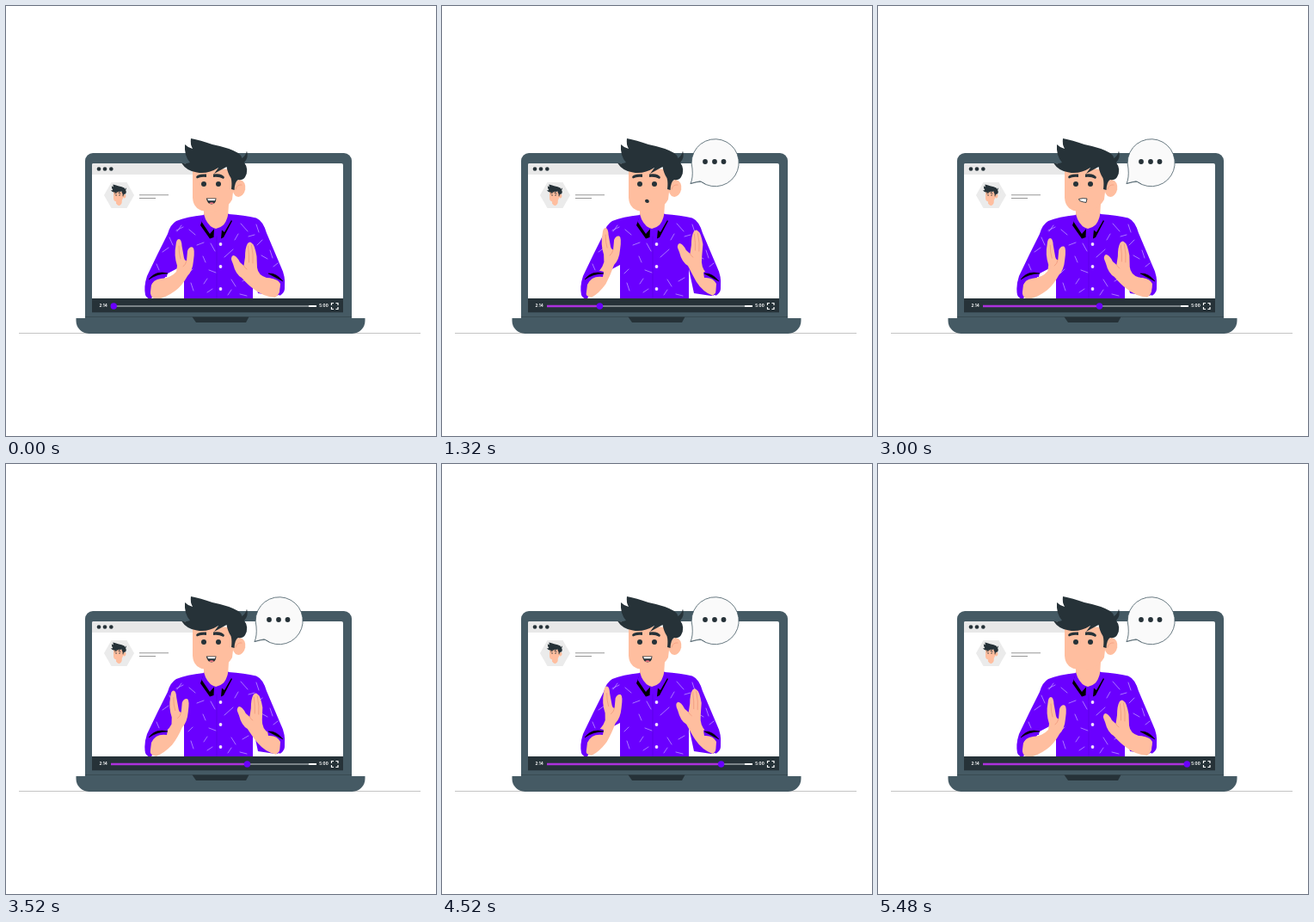
Recreate the animation shown at these times as an HTML page. Size 500 by 500 pixels, loop 5.52 s.

```html
<!DOCTYPE html>
<html lang="en">
<head>
<meta charset="utf-8">
<title>Video lesson</title>
<style>
  html, body { margin: 0; width: 100%; height: 100%; overflow: hidden; background: #fff; }
  svg { display: block; width: 100%; height: 100%; }
  .time { font: 700 4.5px Inter, Roboto, sans-serif; fill: #fff; }
  .skin { fill: #ffbe9f; }
  .ink { fill: #263238; }
  .slate { fill: #455a64; }
  .shirt { fill: #6a00ff; }
  .line { fill: none; stroke-linecap: round; stroke-linejoin: round; }
</style>
</head>
<body>
<svg viewBox="0 0 500 500">
  <defs>
    <g id="head">
      <path class="skin" d="M230 232V247Q232 256 244 259Q256 256 258 246L259 230Z"/>
      <path class="skin" d="M217 188V223Q218 238 234 239Q254 241 263 225L267 190Z"/>
      <ellipse class="skin" cx="271" cy="212" rx="7.300" ry="10" transform="rotate(10 271 212)"/>
      <path class="line" stroke="#f29a7c" stroke-width=".7" d="M267 213Q269 207 274 208"/>
      <path class="ink" d="M204 182.500Q209 184 214 182Q207 174 208 161Q212 165 217 166Q214 161 215 154Q226 156 240 161Q260 165 270 171Q273 173 274.500 177Q279 174 280 168.500Q282.500 176 277 182Q283 190 278 199Q275 203 270 202Q266 204 265.500 214L262 213Q263 205 261.500 200Q258 195 256.500 187Q249 191 242 195Q245 191 247 188Q234 196 222 193.500Q210 192 204 182.500Z"/>
      <path class="ink" d="M221 199Q222 195 233 195.500L233 199Q227 198 222 200.500ZM241 195.500Q251 194 254 199L253 201Q247 198 241 199Z"/>
      <circle class="ink" cx="230" cy="207" r="3"/>
      <circle class="ink" cx="247" cy="207" r="3"/>
    </g>
  </defs>

  <rect width="500" height="500" fill="#fff"/>
  <path d="M15 380.500H482" stroke="#c4c4c4"/>

  <!-- laptop -->
  <path class="slate" d="M92 363V180A9 9 0 0 1 101 171H393A9 9 0 0 1 402 180V363Z"/>
  <rect x="100" y="183" width="292" height="160" rx="2" fill="#fff"/>
  <path d="M100 196V185Q100 183 102 183H240V196Z" fill="#e8e8e8"/>
  <g class="ink">
    <circle cx="108" cy="189.500" r="2.300"/>
    <circle cx="115" cy="189.500" r="2.300"/>
    <circle cx="122.300" cy="189.500" r="2.300"/>
  </g>
  <path d="M114 220L122.500 205H140.500L149 220L140.500 235H122.500Z" fill="#ebebeb"/>
  <use href="#head" transform="translate(74 171.300) scale(.235)"/>
  <path d="M155 219.800H189M155 223.500H174" stroke="#969696" stroke-width="1.100"/>

  <!-- presenter -->
  <path class="shirt" d="M230 243Q210 245 198 250Q191 254 188 265L176 289L164 314Q160 326 162 336Q164 341 169 340L188 311L207 301V341H287V306L293 334L313 337Q324 336 324 326Q325 314 320 304L303 264Q299 250 291 246.500Q277 243 259 242Z"/>
  <path class="line" stroke="#bd95ff" stroke-width=".8" d="M213 260l7 6M238 276l5 9M273 253l8 9M254 292l10-9M229 291l3 7M217 306l-5 5M262 318l5 8M230 323l4-6M215 322l3 9M275 320l7-4M266 272l4 -7M222 278l8-3M236 307l8 3M258 336l4-6M272 335l8 2M206 257l-8 4M190 269l4 9M182 286l7-5M175 300l3 7M199 262l5-7M291 254l3 9M298 272l-6 6M297 290l7 4M307 284l3 9M311 303l5-4M282 268l7-2M240 329l-6 4"/>
  <path class="line" stroke="#5200d0" stroke-width=".5" d="M245 268V341"/>
  <use href="#head"/>
  <path d="M229 247L226 255L237 270.500L241.500 269L242 259L237 264ZM251 260L250 270.500L253 269L263 250L260 247Z"/>
  <path class="shirt" d="M230 242L227.500 251L237 265L242 259Q233 254 230 242ZM258.500 241L262 249L254 263L249 259Q257 252 258.500 241Z"/>
  <g fill="#f3dfff">
    <circle cx="249.500" cy="277" r="1.900"/>
    <circle cx="249.500" cy="303" r="1.900"/>
    <circle cx="249.500" cy="329" r="1.900"/>
  </g>
  <g id="mouths">
    <g>
      <path class="ink" d="M232.800 223.500H244.500Q244 230.500 239 230.500Q234 230 232.800 223.500Z"/>
      <path d="M234.200 224.300H243.600L243 226.300H235Z" fill="#fff"/>
      <path d="M236 229.200Q239 227.200 242 229.200Q239 231 236 229.200Z" fill="#f2727f"/>
    </g>
    <path class="ink" d="M236 226Q238 223.500 240.500 226Q241.500 228.500 239 229Q236 229 236 226Z"/>
    <path d="M233.500 224.500Q238 223 243 224L242 228.500Q238 228 234.500 226.500Z" fill="#fff" stroke="#263238" stroke-width=".9"/>
  </g>

  <g id="arms">
    <path class="skin"/><path class="line" stroke="#ee9478" stroke-width=".7"/>
    <path class="skin"/><path class="line" stroke="#ee9478" stroke-width=".7"/>
  </g>
  <path class="shirt" d="M162 330Q161 314 173 309Q181 306 188 309L187 315Q174 313 169 324L167 340Q162 338 162 330ZM324 328Q325 313 316 309Q308 306 304 310L305 316Q315 315 319 323L318 337Q324 334 324 328Z"/>
  <path d="M166 318Q174 307 188 311Q176 311 166 318ZM305 311Q314 310 322 320Q314 316 305 311Z" stroke="#000" stroke-width=".6"/>

  <!-- player bar and base -->
  <rect class="ink" x="100" y="340" width="292" height="16.300"/>
  <path d="M92 361.500H402" stroke="#37474f" stroke-width=".8"/>
  <path class="slate" d="M81.500 363H417.500V366A15 15 0 0 1 402.500 381H96.500A15 15 0 0 1 81.500 366Z"/>
  <path class="ink" d="M216.500 361.500H282.500L279 368H221Z"/>
  <text class="time" x="108.500" y="350.300">2:14</text>
  <text class="time" x="364.300" y="350.300">5:00</text>
  <path d="M122 349H361" stroke="#cfd5d8" stroke-width="1.200"/>
  <path d="M352 349H361" stroke="#fff" stroke-width="2"/>
  <path id="played" stroke="#ad31dd" stroke-width="2.300"/>
  <circle id="knob" cy="349" r="3.700" fill="#6a00ff"/>
  <path fill="none" stroke="#fff" stroke-width="1.200" d="M378.500 348V345.500H381M383.500 345.500H386V348M386 350V352.500H383.500M381 352.500H378.500V350"/>

  <g id="bubble">
    <path d="M291 189A27.500 27.500 0 1 1 301.500 204.500Q296 204 289 206.500Q292 200 291 189Z" fill="#fafafa" stroke="#455a64" stroke-width=".8"/>
    <path class="line" stroke="#455a64" stroke-width=".6" d="M289 206.500Q296 205 300 203.500L306 207"/>
    <g class="ink">
      <circle cx="306" cy="181" r="2.900"/>
      <circle cx="317" cy="181" r="2.900"/>
      <circle cx="327.500" cy="181" r="2.900"/>
    </g>
  </g>
</svg>
<script>
const LOOP = 5520, GESTURE = LOOP / 2;
const $ = id => document.getElementById(id);
const clamp = v => Math.max(0, Math.min(1, v));
const smooth = v => (1 - Math.cos(Math.PI * clamp(v))) / 2;

// Each arm bends away from a fixed elbow; the hand travels by `shift`.
const arms = [
  {
    elbow: [170, 332], shift: [-11, -13],
    skin: 'M168 326Q171 318 180 317Q192 316 198 309L199 302Q195 290 197.500 278Q198 271 201 271Q204 271 204.500 279L207 293Q208 297 210 296L211 285Q213 279.500 217 280.500Q220 282 218 296Q217 308 211 314Q205 325 197 331Q186 339 176 341Q166 341 168 326Z',
    crease: 'M201 279Q201 288 203 294M210 296Q209 301 206 303'
  },
  {
    elbow: [316, 330], shift: [12, -14],
    skin: 'M319 321Q311 316 303 316Q293 313 292 304L291.500 291Q289 277 286 276Q284 273 281 276Q278 281 278 292L276.500 302L272 298Q268 290 264 290Q260 292 264 300Q267 312 274 316Q282 325 288 329Q299 338 313 339Q320 335 319 321Z',
    crease: 'M281.500 279Q283 290 282.500 298M285.500 278Q288 290 287 299M276.500 302Q278 305 280 306'
  }
];

function bend(path, { elbow, shift }, spread, lift) {
  return path.replace(/([\d.]+) ([\d.]+)/g, (_, a, b) => {
    const x = +a, y = +b;
    const reach = clamp(Math.hypot(x - elbow[0], y - elbow[1]) / 40) ** 1.3;
    return `${(x + shift[0] * reach * spread).toFixed(2)} ${(y + shift[1] * reach * lift).toFixed(2)}`;
  });
}

// [start time, mouth index]; -1 is closed
const SMILE = 0, ROUND = 1, TEETH = 2, CLOSED = -1;
const speech = [[0, SMILE], [160, TEETH], [480, SMILE], [1080, ROUND], [1520, SMILE], [2040, ROUND], [2560, CLOSED]];

// Rises, holds briefly, then returns to rest at `end`.
const swing = (t, end) => smooth(t / 1400) * smooth((end - t) / (end - 1600));

function draw(t) {
  const phase = t % GESTURE;
  // The hands close inwards before they sink.
  const spread = swing(phase, 2240), lift = swing(phase, GESTURE);
  const parts = $('arms').children;
  arms.forEach((arm, i) => {
    parts[2 * i].setAttribute('d', bend(arm.skin, arm, spread, lift));
    parts[2 * i + 1].setAttribute('d', bend(arm.crease, arm, spread, lift));
  });

  const mouth = speech.filter(([start]) => start <= phase).pop()[1];
  [...$('mouths').children].forEach((el, i) => {
    el.style.display = i === mouth ? '' : 'none';
  });

  const x = Math.min(359.3, 125.2 + t * 0.0441);
  $('knob').setAttribute('cx', x);
  $('played').setAttribute('d', `M122 349H${x}`);

  const pop = smooth((t - 160) / 440);
  $('bubble').style.display = pop ? '' : 'none';
  $('bubble').setAttribute('transform', `translate(289 207) scale(${pop}) translate(-289 -207)`);
}

function tick(now) {
  draw(now % LOOP);
  requestAnimationFrame(tick);
}
draw(0);
requestAnimationFrame(tick);
</script>
</body>
</html>
```
